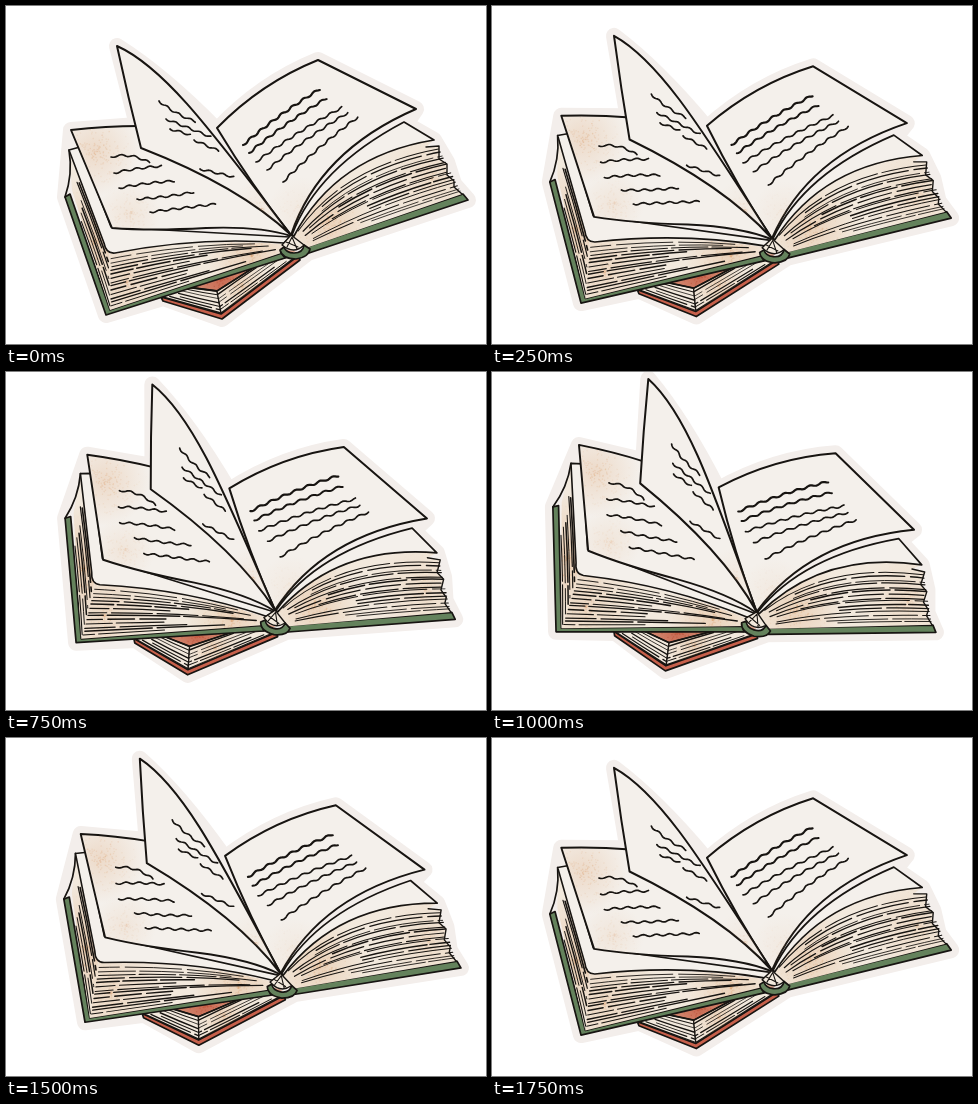
These frames come from a looping animation (480 by 338 pixels, 2000 ms). An HTML page with a canvas:

```html
<!DOCTYPE html>
<html lang="en">
<head>
<meta charset="utf-8">
<title>Open book</title>
<style>
html, body { margin: 0; width: 100%; height: 100%; overflow: hidden; background: #fff; }
canvas { display: block; width: 480px; height: 338px; }
</style>
</head>
<body>
<canvas id="stage" width="480" height="338"></canvas>
<script>
const W = 480, H = 338, HOLD = 250;
const ANGLES = [0, 4.7, 9.4, 14.1, 17.7, 14.1, 9.4, 4.7];
const INK = '#171411', PAPER = '#f4f0eb', CREAM = '#f2e9dd', EDGE = '#f3eeeb';
const GREEN = '#64825c', RED = '#c7604b', TAN = '#dca678';
const ctx = document.getElementById('stage').getContext('2d');
ctx.lineCap = ctx.lineJoin = 'round';

let seed = 1;
function rnd() {
  seed = (seed * 16807) % 2147483647;
  return seed / 2147483647;
}

function fill(path, color) {
  ctx.fillStyle = color;
  ctx.fill(new Path2D(path));
}

function ink(path, width = 1.9, color = INK) {
  ctx.strokeStyle = color;
  ctx.lineWidth = width;
  ctx.stroke(new Path2D(path));
}

function shape(path, color, width) {
  fill(path, color);
  ink(path, width);
}

// Soft stain with paper grain, kept inside a path
function stain(path, x, y, r, alpha, color = TAN) {
  ctx.save();
  ctx.clip(new Path2D(path));
  const g = ctx.createRadialGradient(x, y, 0, x, y, r);
  g.addColorStop(0, color);
  g.addColorStop(1, color + '00');
  ctx.globalAlpha = alpha;
  ctx.fillStyle = g;
  ctx.fillRect(x - r, y - r, 2 * r, 2 * r);
  ctx.fillStyle = color;
  for (let i = 0; i < r * 5; i++) {
    const a = rnd() * 6.283, d = rnd() * r;
    ctx.globalAlpha = alpha * (1 - d / r);
    ctx.fillRect(x + Math.cos(a) * d, y + Math.sin(a) * d, 1.3, 1.3);
  }
  ctx.restore();
}

// Handwriting line: a wave along a sagging curve
function scribble(x0, y0, x1, y1, sag = 0, width = 1.7) {
  const len = Math.hypot(x1 - x0, y1 - y0);
  const nx = -(y1 - y0) / len, ny = (x1 - x0) / len;
  ctx.beginPath();
  for (let d = 0; d <= len; d += 1.5) {
    const t = d / len;
    const off = Math.sin(d / 2.1) * 0.95 + sag * 4 * t * (1 - t);
    ctx.lineTo(x0 + (x1 - x0) * t + nx * off, y0 + (y1 - y0) * t + ny * off);
  }
  ctx.strokeStyle = INK;
  ctx.lineWidth = width;
  ctx.stroke();
}

// Page edges: broken curves between two guide curves [x0,y0, cx,cy, x1,y1];
// each begins at a random distance, up to `gap`, along its curve
function leaves(a, b, n, gap = 0, width = 1) {
  for (let i = 0; i < n; i++) {
    const k = (i + 0.3 + rnd() * 0.5) / n, s = rnd() * gap;
    const [x0, y0, cx, cy, x1, y1] = a.map((v, j) => v + (b[j] - v) * k);
    const mix = (p, q) => p + (q - p) * s;
    const mx = mix(cx, x1), my = mix(cy, y1);
    ctx.setLineDash([25 + rnd() * 50, 3 + rnd() * 3]);
    ink(`M${mix(mix(x0, cx), mx)} ${mix(mix(y0, cy), my)}Q${mx} ${my} ${x1} ${y1}`,
      width * (0.7 + rnd() * 0.7));
  }
  ctx.setLineDash([]);
}

const SILHOUETTE = 'M111 40Q157 69 211 124Q255 77 312 54L410 103L400 118L428 134L441 156' +
  'L448 178L462 194L302 247L216 313L157 292L100 309L59 191L65 124L131 119Z';

function redBook() {
  shape('M155 291L215 308L292 250L294 254L216 313L157 295Z', RED, 1.7);
  const top = 'M174 282L211 285L290 245L250 240Z';
  fill(top, '#dda189');
  stain(top, 215, 272, 45, 0.75, '#c0573f');
  const left = 'M157 291L180 281L211 285L215 307Z';
  const right = 'M211 285L255 257L292 249L215 307Z';
  shape(left, CREAM, 1.3);
  shape(right, CREAM, 1.3);
  stain(right, 235, 280, 30, 0.3);
  leaves([181, 282, 196, 285, 211, 287], [160, 291, 187, 299, 215, 306], 5, 0.2);
  leaves([256, 257, 234, 271, 212, 287], [290, 250, 252, 279, 215, 305], 5, 0.3);
  ink('M180 281L211 285L255 257', 1.8);
}

function leftBlock() {
  shape('M59 191L100 309L279 252L276 247L104 304L64 188Z', GREEN, 1.7);
  const side = 'M63 144L66 184L104 304L103 247Z';
  const front = 'M103 247Q190 232 276 238L278 246L104 304Z';
  fill(side, CREAM);
  fill(front, CREAM);
  stain(side, 88, 235, 65, 0.4);
  stain(front, 120, 275, 60, 0.25);
  stain(front, 245, 248, 45, 0.35);
  leaves([64, 150, 84, 197, 102, 249], [64, 188, 85, 240, 104, 302], 6, 0.3, 1.2);
  leaves([105, 250, 195, 233, 275, 238].map((v, i, p) => p[(4 - (i & ~1)) + (i & 1)]),
    [276, 246, 195, 273, 105, 302], 13, 0.6, 1.1);
  ink('M63 144Q67 168 59 191', 1.7);
}

function rightBlock() {
  shape('M298 242L457 188L462 194L303 247Z', GREEN, 1.7);
  const block = 'M287 230Q312 164 398 116L428 134L420 141L433 140L433 153L441 158' +
    'L441 169L448 175L448 181L456 188L300 242Z';
  fill(block, CREAM);
  stain(block, 322, 215, 48, 0.35);
  stain(block, 425, 172, 50, 0.2);
  leaves([289, 229, 333, 160, 432, 142], [300, 241, 370, 214, 455, 187], 15, 0.5, 1.1);
  ink('M420 141L433 140L433 153L441 158L441 169L448 175L448 181L456 188', 1.4);
  shape('M286 229Q311 162 398 116L428 134Q330 150 288 230Z', PAPER, 1.7);
}

function leftPage() {
  shape('M74 141L63 144L98 237Q100 248 109 247Q195 230 278 237L284 231L105 221Z', PAPER, 1.6);
  const page = 'M65 124L133 120L236 180L285 230Q254 220 200 222Q145 225 106 222Z';
  fill(page, PAPER);
  stain(page, 88, 145, 45, 0.3);
  stain(page, 123, 208, 32, 0.15);
  ink('M134 120Q100 120 65 124L106 222Q145 225 200 222Q254 220 285 230', 1.9);
  scribble(105, 151, 144, 157, -4);
  scribble(108, 167, 157, 160, -1);
  scribble(113, 182, 169, 175, -1);
  scribble(131, 193, 188, 186, 1);
  scribble(144, 206, 210, 198, 0);
}

function rightPage() {
  const page = 'M285 229Q246 180 211 122Q255 77 312 54L410 103Q313 145 285 229Z';
  shape(page, PAPER, 2);
  stain(page, 296, 205, 34, 0.1);
  scribble(237, 139, 314, 83, -2, 2.2);
  scribble(243, 147, 321, 92, -2, 2);
  scribble(250, 156, 337, 101, -2);
  scribble(261, 164, 343, 106, -2);
  scribble(277, 176, 352, 111, -2);
}

function turningPage() {
  const page = 'M111 40C160 62 209 130 285 229C246 192 194 165 135 142Q122 91 111 40Z';
  shape(page, PAPER, 2);
  stain(page, 255, 202, 30, 0.1);
  scribble(153, 95, 191, 116, 2);
  scribble(160, 113, 205, 131, 0);
  scribble(164, 123, 185, 129, 0);
  scribble(188, 134, 213, 145, 0);
  scribble(194, 163, 228, 171, 0);
}

function spine() {
  shape('M274 244Q276 253 290 253Q303 251 304 243L298 239Q297 247 288 247Q280 247 278 241Z', GREEN, 1.7);
  shape('M285 229L276 239Q288 249 298 239Z', CREAM, 1.4);
  ink('M286 231L281 241M286 231L291 243M280 236L292 241', 1.1);
}

function draw(deg) {
  seed = 77;
  ctx.fillStyle = '#fff';
  ctx.fillRect(0, 0, W, H);
  ctx.save();
  ctx.translate(W / 2, H / 2);
  ctx.rotate(deg * Math.PI / 180);
  ctx.translate(-W / 2, -H / 2);
  fill(SILHOUETTE, EDGE);
  ink(SILHOUETTE, 16, EDGE);
  [redBook, leftBlock, rightBlock, leftPage, rightPage, turningPage, spine].forEach(f => f());
  ctx.restore();
}

const start = performance.now();
let shown = -1;
function tick() {
  const step = Math.floor((performance.now() - start) / HOLD) % ANGLES.length;
  if (step !== shown) draw(ANGLES[shown = step]);
  requestAnimationFrame(tick);
}
tick();
</script>
</body>
</html>
```
